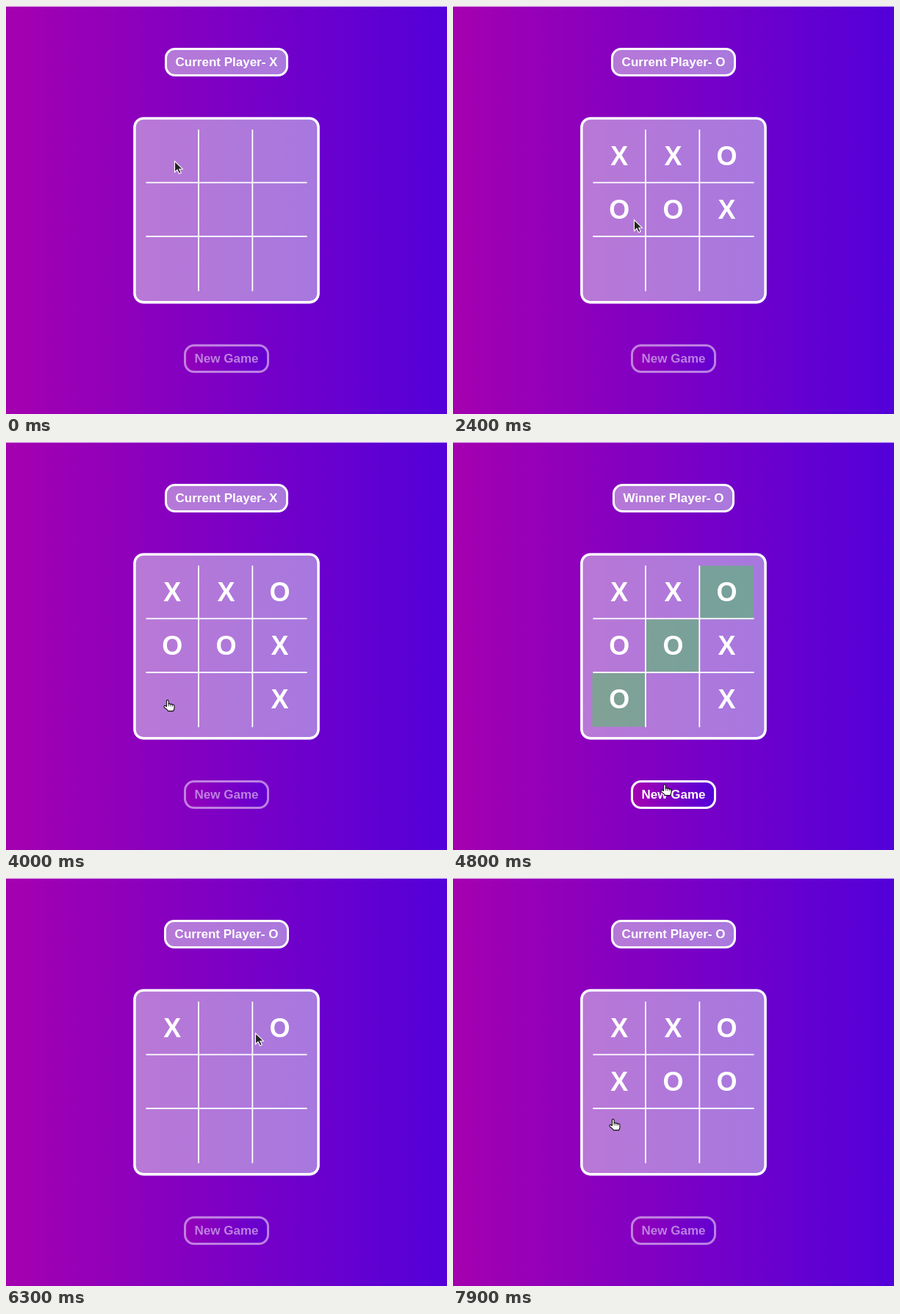
An HTML page for the animation above (8 s loop, 600x556 px).

```html
<!DOCTYPE html>
<html lang="en">
<head>
<meta charset="utf-8">
<title>Tic Tac Toe</title>
<style>
  html, body { margin: 0; width: 100%; height: 100%; overflow: hidden; }
  body {
    --fade: linear-gradient(90deg, #a500b0, #5300d9);
    --glass: rgba(233, 255, 242, .47);
    position: relative;
    background: var(--fade);
    color: #fff;
    font: bold 17px "Liberation Sans", Arial, sans-serif;
  }
  .edge { position: absolute; inset: 0 0 auto; height: 1px; background: rgba(255, 255, 255, .75); }
  .row { position: absolute; left: 0; width: 600px; display: flex; justify-content: center; }
  .pill {
    box-sizing: border-box;
    height: 39px;
    padding: 0 12px;
    border: 3.5px solid #fff;
    border-radius: 14px;
    line-height: 33px;
    white-space: pre;
  }
  #info { background: var(--glass); }
  #again { background: var(--fade); opacity: .5; }
  #again.active { opacity: 1; }
  svg { position: absolute; left: 0; top: 0; }
  .board { fill: var(--glass); }
  .mark { font-size: 36px; fill: #fff; text-anchor: middle; }
  .win { fill: rgba(0, 255, 0, .3); }
</style>
</head>
<body>
<div class="edge"></div>
<div class="row" style="top:57px"><div class="pill" id="info"></div></div>
<div class="row" style="top:461px"><div class="pill" id="again">New Game</div></div>
<svg width="600" height="556" viewBox="0 0 600 556">
  <rect class="board" x="173.3" y="151.4" width="253.4" height="254" rx="14"/>
  <rect x="175" y="153.1" width="250" height="250.6" rx="12" fill="none" stroke="#fff" stroke-width="3.4"/>
  <g id="cells"></g>
  <path d="M262 168.5V388.5M335.3 168.5V388.5M190.5 240.7H409.5M190.5 314H409.5" stroke="#fff" stroke-width="1.8"/>
  <g id="cursor">
    <path id="arrow" d="M.5 .5V15.5L4 12.2L6.6 17.6L9.3 16.4L6.8 11.2H11.3Z" fill="#222" stroke="#fff" stroke-width="1.1"/>
    <g id="hand" transform="translate(-7 0)" stroke-linejoin="round" stroke-linecap="round">
      <path d="M4.5 9.5V2Q4.5 .6 5.8 .6T7.2 2V6Q8.6 5.2 9.8 6.3Q11.2 5.7 12.3 6.9Q15 6.5 15 9V11.2Q15 13.5 13.6 15.6H6.6Q5.4 13.6 2.6 11.7Q.2 9.8 1.2 8.7Q2.4 7.7 4.5 9.5Z" fill="#fff" stroke="#111" stroke-width="1.1"/>
      <path d="M7.2 6V8.8M9.8 6.6V9M12.3 7.2V9.2" fill="none" stroke="#111" stroke-width=".8"/>
    </g>
  </g>
</svg>
<script>
const LOOP = 8000, STEP = 100, RESET = 5100;
const CELL = 73.2, LEFT = 189.4, TOP = 168.5;
const LINES = ["012", "345", "678", "036", "147", "258", "048", "246"];
const $ = id => document.getElementById(id);

const corner = i => ({ x: LEFT + i % 3 * CELL, y: TOP + Math.floor(i / 3) * CELL });

// Cells clicked in turn at a steady pace
const run = (start, pace, order) =>
  [...order].map((cell, i) => ({ time: start + i * pace, cell: +cell }));

const moves = [
  ...run(100, 400, "025413"),
  ...run(3200, 1000, "86"),
  ...run(5700, 400, "021435")
].map((move, i) => ({ ...move, mark: "XO"[i % 2] }));

// The pointer visits every clicked cell, the button, and a few points on the way
const aim = ({ time, cell }) => {
  const { x, y } = corner(cell);
  return { time, x: x + CELL / 2 + 3, y: y + CELL / 2 + 6 };
};
const stops = [
  ...moves.map(aim),
  { time: 1100, x: 279, y: 277 },
  { time: 2400, x: 246, y: 291 },
  { time: 4000, x: 221, y: 351 },
  { time: 5000, x: 300, y: 486 },
  { time: 5600, x: 243, y: 214 },
  { time: 7100, x: 250, y: 271 },
  { time: 7900, x: 219, y: 328 }
].sort((a, b) => a.time - b.time);

function svg(tag, attrs) {
  const el = document.createElementNS("http://www.w3.org/2000/svg", tag);
  for (const k in attrs) el.setAttribute(k, attrs[k]);
  return $("cells").appendChild(el);
}

const cells = Array.from({ length: 9 }, (_, i) => {
  const { x, y } = corner(i);
  return {
    tile: svg("rect", { x, y, width: CELL, height: CELL, fill: "none" }),
    text: svg("text", { x: x + CELL / 2 + .2, y: y + 48.5, class: "mark" })
  };
});

function stateAt(t) {
  const board = Array(9).fill("");
  let last = "X";
  for (const { time, cell, mark } of moves) {
    if (time <= t && (t < RESET || time >= RESET)) board[cell] = last = mark;
  }
  const win = LINES.find(l => board[l[0]] && [...l].every(c => board[c] === board[l[0]])) || "";
  return { board, last, win };
}

function pointerAt(t) {
  const next = stops.findIndex(s => s.time > t);
  if (next < 1) return stops.at(next);
  const a = stops[next - 1], b = stops[next];
  const u = (t - a.time) / (b.time - a.time), e = u * u * (3 - 2 * u);
  return { x: a.x + (b.x - a.x) * e, y: a.y + (b.y - a.y) * e };
}

function isHand({ x, y }, { board, win }) {
  if (win) return x > 242 && x < 358 && y > 461 && y < 500;
  return board.some((mark, i) => {
    const c = corner(i);
    return !mark && x >= c.x && x < c.x + CELL && y >= c.y && y < c.y + CELL;
  });
}

function draw(t) {
  const { board, last, win } = stateAt(t);
  cells.forEach((c, i) => {
    c.text.textContent = board[i];
    c.tile.setAttribute("class", win.includes(i) ? "win" : "");
  });
  $("info").textContent = `${win ? "Winner" : "Current"} Player- ${last}`;
  $("again").classList.toggle("active", win !== "");

  // The pointer shape reacts one step before the mark appears
  const p = pointerAt(t);
  const hand = isHand(p, stateAt(t + STEP));
  $("cursor").setAttribute("transform", `translate(${Math.round(p.x)} ${Math.round(p.y)})`);
  $("hand").style.display = hand ? "" : "none";
  $("arrow").style.display = hand ? "none" : "";
}

const begin = performance.now();
function tick() {
  const t = (performance.now() - begin) % LOOP;
  draw(Math.floor(t / STEP) * STEP);
  requestAnimationFrame(tick);
}
tick();
</script>
</body>
</html>
```
